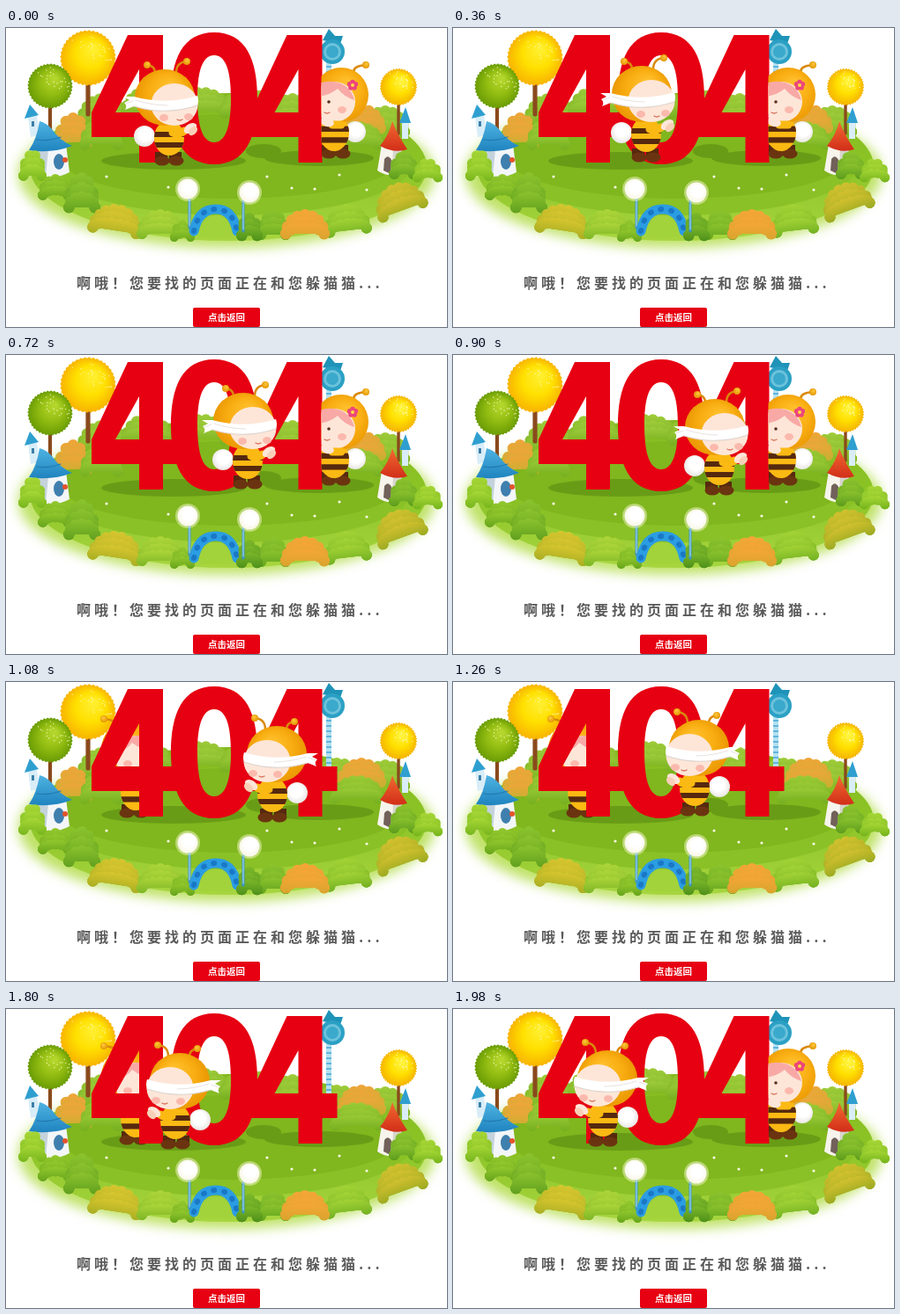
Recreate the animation shown at these times as an HTML page with a canvas. Size 500 by 340 pixels, loop 2.16 s.

```html
<!DOCTYPE html>
<html lang="zh">
<head>
<meta charset="utf-8">
<style>
html, body { margin: 0; width: 100%; height: 100%; overflow: hidden; background: #fff; }
body { position: relative; font-family: "Noto Sans CJK SC", "Noto Sans CJK", sans-serif; }
canvas { position: absolute; left: 0; top: 0; }
p, span { position: absolute; margin: 0; white-space: nowrap; }
p { left: 80px; top: 276px; font-size: 16px; font-weight: 700; line-height: 26px; letter-spacing: 4px; color: #5a5a5a; }
span { left: 212px; top: 318px; width: 76px; height: 22px; border-radius: 2px; background: #e60012;
  color: #fff; font-size: 10.5px; font-weight: 700; line-height: 21px; text-align: center; }
</style>
</head>
<body>
<canvas id="stage" width="500" height="340"></canvas>
<p>啊哦！您要找的页面正在和您躲猫猫...</p>
<span>点击返回</span>
<script>
const W = 500, H = 340, STEP = 180, TAU = Math.PI * 2;
const RED = '#e60012', SKIN = '#fde6d8', BROWN = '#56290f', YELLOW = '#fbb913';
const view = document.getElementById('stage').getContext('2d');
let g = view;

function layer(paint) {
  const c = document.createElement('canvas');
  c.width = W;
  c.height = H;
  g = c.getContext('2d');
  paint();
  g = view;
  return c;
}

function oval(x, y, rx, ry, fill, tilt = 0) {
  g.beginPath();
  g.ellipse(x, y, rx, ry, tilt, 0, TAU);
  g.fillStyle = fill;
  g.fill();
}
const disc = (x, y, r, fill) => oval(x, y, r, r, fill);

function shape(d, fill) {
  g.fillStyle = fill;
  g.fill(new Path2D(d), 'evenodd');
}

function line(d, color, width) {
  g.strokeStyle = color;
  g.lineWidth = width;
  g.lineCap = 'round';
  g.stroke(new Path2D(d));
}

function rect(x, y, w, h, fill) {
  g.fillStyle = fill;
  g.fillRect(x, y, w, h);
}

function stops(grad, colors) {
  colors.forEach((c, i) => grad.addColorStop(i / (colors.length - 1), c));
  return grad;
}
const down = (y0, y1, ...colors) => stops(g.createLinearGradient(0, y0, 0, y1), colors);
const ball = (x, y, r, ...colors) =>
  stops(g.createRadialGradient(x + r * .2, y - r * .35, r * .1, x, y, r), colors);

function random(seed) {
  return () => (seed = seed * 16807 % 2147483647) / 2147483647;
}

// Shrub standing on y: three rows of leafy lobes, the front row lowest
function bush(x, y, w, h, light, dark, tilt = 0) {
  const n = Math.max(4, Math.round(w / 7));
  g.save();
  g.translate(x, y);
  g.rotate(tilt);
  for (let row = 0; row < 3; row++) {
    const top = h * (1 - row * .27), r = Math.min(h * .24, w / n * .9);
    g.beginPath();
    g.ellipse(0, 0, w / 2 - r * .5, top - r * .6, 0, Math.PI, TAU);
    for (let i = 0; i <= n; i++) {
      const a = Math.PI * (1 + i / n);
      const cx = Math.cos(a) * (w / 2 - r), cy = Math.sin(a) * (top - r);
      g.moveTo(cx + r, cy);
      g.arc(cx, cy, r, 0, TAU);
    }
    g.fillStyle = down(-top, h * .35, light, dark);
    g.fill();
  }
  g.restore();
}

function tree(x, y, r, base, light, mid, dark, seed) {
  line(`M${x} ${y + r - 4}L${x} ${base}`, '#8a4a1c', r / 6);
  g.beginPath();
  for (let i = 0; i <= 160; i++) {
    const a = i / 160 * TAU, q = r + Math.sin(a * 40) * .7;
    g.lineTo(x + Math.cos(a) * q, y + Math.sin(a) * q);
  }
  g.fillStyle = ball(x, y, r, light, mid, dark);
  g.fill();
  const rnd = random(seed);
  for (let i = 0; i < 26; i++) {
    const a = -2.3 + rnd() * 2.6, d = Math.sqrt(rnd()) * r * .9;
    disc(x + Math.cos(a) * d, y + Math.sin(a) * d, .8, 'rgba(255,252,190,.7)');
  }
}

function lamp(x, y, tilt) {
  line(`M${x + tilt} ${y + 10}L${x + tilt} ${y + 44}`, '#3a94c8', 3);
  line(`M${x + tilt} ${y + 13}L${x + tilt} ${y + 42}`, '#b4e2f4', 1);
  disc(x, y, 14, 'rgba(255,255,220,.45)');
  disc(x, y, 11.5, ball(x, y, 12, '#fff', '#fff', '#f8f6e4'));
}

function island() {
  g.save();
  g.filter = 'blur(7px)';
  oval(250, 166, 236, 84, '#bfe268');
  g.restore();
  g.save();
  g.beginPath();
  g.ellipse(252, 158, 225, 84, 0, 0, TAU);
  g.clip();
  rect(0, 60, W, 200, down(70, 245, '#84b91e', '#8cc426', '#a8d640'));
  oval(255, 155, 205, 58, '#8ac126');
  oval(255, 146, 195, 48, '#80b61e');
  oval(190, 151, 82, 10, '#699c16');
  oval(292, 140, 20, 8, '#699c16');
  oval(355, 148, 62, 9, '#699c16');
  g.restore();
  rect(60, 40, 380, 30, '#fff');
}

function houses() {
  shape('M25 101L35 99L38 122L28 124Z', '#d8edf8');
  shape('M21 103L27 87L37 99Z', '#2f9fd0');
  rect(29, 106, 3, 6, '#3d7fa8');
  shape('M34 134L68 132L72 164Q54 174 32 166Z', '#f3f6f8');
  shape('M34 136L48 138L45 169Q37 169 32 166Z', '#c4d2dc');
  shape('M38 106Q46 108 52 115Q61 128 75 134Q52 143 26 139Q35 126 38 106Z', down(106, 140, '#4fb3e2', '#1f84bf'));
  line('M35 127Q48 129 62 124', '#1f79b2', 1.2);
  oval(60, 152, 6, 9, '#3f7fae');
  disc(67, 150, 3, '#e4532c');

  rect(449, 106, 7, 20, '#d9edf9');
  shape('M446 108L453 90L459 108Z', '#2f9fd0');
  shape('M426 132L449 134L445 166Q432 170 421 162Z', '#f6f4ec');
  shape('M439 133L449 134L445 166L438 167Z', '#d6d4cc');
  shape('M438 106Q443 120 455 138Q440 143 424 134Q434 122 438 106Z', down(106, 142, '#f36a32', '#cf2a16'));
  shape('M428 162L429 149Q433 143 437 150L436 166Z', '#71615a');
}

function signpost() {
  rect(363, 38, 6, 61, '#b4e0f0');
  for (let y = 43; y < 98; y += 6) rect(363, y, 6, 2, '#5eb4de');
  shape('M359 14L366 1L373 9L382 9L379 18Z', '#1f93b8');
  disc(370, 27, 14, '#2ba0c4');
  disc(370, 27, 10, '#6cc2dc');
  disc(370, 27, 7, '#3aa9cb');
}

function bridge() {
  const arch = 'M213 231Q218 206 238 206Q257 206 262 231';
  line(arch, '#2b9de2', 11);
  g.setLineDash([1, 11]);
  line(arch, '#1a78c6', 6);
  g.setLineDash([]);
  shape('M219 238Q223 213 238 213Q252 213 257 238Z', '#a2d33a');
}

const back = layer(() => {
  island();
  for (const [x, y, w, h] of [[110, 106, 60, 32], [160, 96, 60, 30], [222, 94, 66, 27], [275, 96, 66, 28], [325, 104, 56, 30], [375, 114, 70, 28], [430, 118, 56, 30]])
    bush(x, y, w, h, '#9fcc3a', '#70ab1c');
  tree(93, 34, 31, 98, '#ffee2e', '#ffe000', '#f8b400', 7);
  tree(50, 66, 25, 118, '#b4d62c', '#93bd12', '#6a9c04', 19);
  tree(445, 67, 20.5, 120, '#fff33c', '#ffe000', '#f5b400', 31);
  bush(76, 130, 44, 34, '#f0a53a', '#b9b42e');
  bush(108, 132, 50, 30, '#9bcb36', '#6eaa1c');
  bush(403, 114, 56, 28, '#f0a53a', '#b9b42e');
  bush(398, 132, 62, 26, '#9bcb36', '#6eaa1c');
  signpost();
  houses();
  bush(30, 168, 32, 30, '#a8d836', '#6cae18');
  bush(56, 190, 40, 24, '#94c92e', '#5f9f18');
  bush(86, 204, 42, 40, '#8cc42e', '#55951a');
  bush(451, 166, 34, 26, '#8cc42e', '#55951a');
  bush(478, 170, 34, 22, '#a8d836', '#6cae18');
  bush(450, 207, 60, 32, '#d3c12f', '#8fa51e', -.35);
  bush(123, 230, 62, 30, '#d8c62f', '#a0aa20', .15);
  bush(175, 234, 54, 28, '#aed63a', '#74b022');
  bush(200, 238, 28, 20, '#94c92e', '#5f9f18');
  bush(388, 230, 54, 30, '#a4d436', '#69aa1e', -.12);
  bush(303, 235, 40, 28, '#8cc42e', '#5a9c1a');
  bush(339, 234, 56, 28, '#f6a636', '#d3a42c');
  bridge();
  bush(276, 236, 30, 26, '#7db82a', '#468a18');
  lamp(206, 183, 2);
  lamp(276, 187, -7);
  for (const [x, y] of [[114, 169], [184, 181], [296, 169], [324, 182], [350, 183], [378, 167], [409, 184]])
    disc(x, y, 1.6, '#f4fbe0');
});

const digits = layer(() => {
  const four = 'M97 96L138 8L178 8L178 96L195 96L195 124L178 124L178 153L151 153L151 124L97 124Z M151 96L151 47L124 96Z';
  shape(four, RED);
  g.translate(180.5, 0);
  shape(four, RED);
  g.translate(-180.5, 0);
  shape('M236 5C272 5 285 36 285 80S272 155 236 155S187 124 187 80S200 5 236 5Z M236 31C221 31 217 54 217 80S221 130 236 130S255 106 255 80S251 31 236 31Z', RED);
});

function antenna(x0, y0, x, y) {
  line(`M${x0} ${y0}Q${x0} ${y + 1} ${x} ${y}`, '#d98a0c', 2.4);
  disc(x, y, 4, ball(x, y, 4.5, '#ffc63a', '#e09200'));
}

function torso(x, y, w, h) {
  g.save();
  g.beginPath();
  g.ellipse(x, y, w, h, 0, 0, TAU);
  g.clip();
  rect(x - w, y - h, 2 * w, 2 * h, YELLOW);
  rect(x - w, y - h * .35, 2 * w, h * .3, BROWN);
  rect(x - w, y + h * .25, 2 * w, h * .3, BROWN);
  g.restore();
}

function boots(x, y, gap) {
  for (const s of [-1, 1]) {
    rect(x + s * gap - 7, y - 15, 14, 11, BROWN);
    oval(x + s * gap + 1, y - 5, 8.5, 5.5, '#6b3410');
  }
}

const hood = (x, y, rx, ry) => oval(x, y, rx, ry, ball(x, y, 37, '#ffbf2c', '#f9ae12', '#e89400'));
const sting = (x, y, r) => disc(x, y, r, ball(x, y, r + 1, '#fff', '#fff', '#e6e3df'));
const cheek = (x, y) => oval(x, y, 5, 4, '#fbb9ad');

// Seeker, facing right from x = 0
function seeker() {
  sting(24, 126, 12);
  antenna(36, 54, 27, 45);
  antenna(60, 54, 72, 41);
  boots(51, 159, 8);
  torso(52, 128, 17, 20);
  hood(47, 82, 34, 32);
  oval(58, 90, 26.5, 24, SKIN);
  cheek(74, 104);
  cheek(46, 105);
  line('M61 107Q64 109 67 107', '#d76c55', 1.3);
  shape('M12 81Q48 91 84 80Q86 86 84 91Q48 103 12 92L2 96Q5 91 1 88L7 85L0 81Z', '#fff');
  line('M12 92Q48 103 84 91', '#dcd3cd', 1.2);
  line('M14 85Q32 91 50 91M3 89L11 86', '#e8e2de', 1);
  line('M56 122Q62 125 69 120', YELLOW, 9);
  oval(76, 117, 8, 5, SKIN, -.6);
  oval(79, 120, 6, 4, '#f8d0b8', -.8);
}

function hider(dy) {
  g.save();
  g.translate(0, dy);
  boots(373, 148, 8);
  torso(372, 119, 17, 21);
  g.restore();
  antenna(394, 50, 408, 42);
  hood(380, 76, 31, 31);
  oval(372, 84, 24, 23, SKIN);
  shape('M346 78Q348 59 371 61Q390 63 395 82Q383 78 376 69Q364 79 346 78Z', '#f8a9a6');
  disc(366, 84, 1.8, '#5a301a');
  cheek(381, 93);
  line('M361 96Q364 98 367 96', '#d76c55', 1.3);
  for (let i = 0; i < 5; i++)
    disc(393 + 3.5 * Math.sin(i * TAU / 5), 65 - 3.5 * Math.cos(i * TAU / 5), 2.8, '#ec457c');
  disc(393, 65, 2, '#ffdb44');
}

function flip(axis, paint) {
  g.save();
  g.translate(axis, 0);
  g.scale(-1, 1);
  paint();
  g.restore();
}

const hiderRight = layer(() => {
  g.beginPath();
  g.rect(357.5, 0, 143, H);
  g.clip();
  sting(396, 118, 12);
  hider(0);
  line('M380 110L370 110', YELLOW, 9);
  oval(364, 107, 8, 5, SKIN, .3);
});
const hiderLeft = layer(() => flip(519, () => hider(6)));

// Left edge of the seeker at each step; he turns round halfway
const walk = [133, 148, 167, 194, 222, 250, 267, 239, 212, 185, 157, 135];

function hop(i) {
  if (i === 0 || i === 11) return -3;
  const up = i < 6 ? i % 2 === 0 : i % 2 === 1;
  return up ? -7 : 0;
}

function draw(ms) {
  const i = Math.floor(ms / STEP) % walk.length;
  const hiddenLeft = i >= 6 && i < 11;
  g.clearRect(0, 0, W, H);
  g.drawImage(back, 0, 0);
  if (hiddenLeft) g.drawImage(hiderLeft, 0, 0);
  g.drawImage(digits, 0, 0);
  if (!hiddenLeft) g.drawImage(hiderRight, 0, 0);
  g.save();
  g.translate(walk[i], hop(i));
  if (i < 6) seeker();
  else flip(87, seeker);
  g.restore();
}

const start = performance.now();
function tick() {
  draw(performance.now() - start);
  requestAnimationFrame(tick);
}
tick();
</script>
</body>
</html>
```
